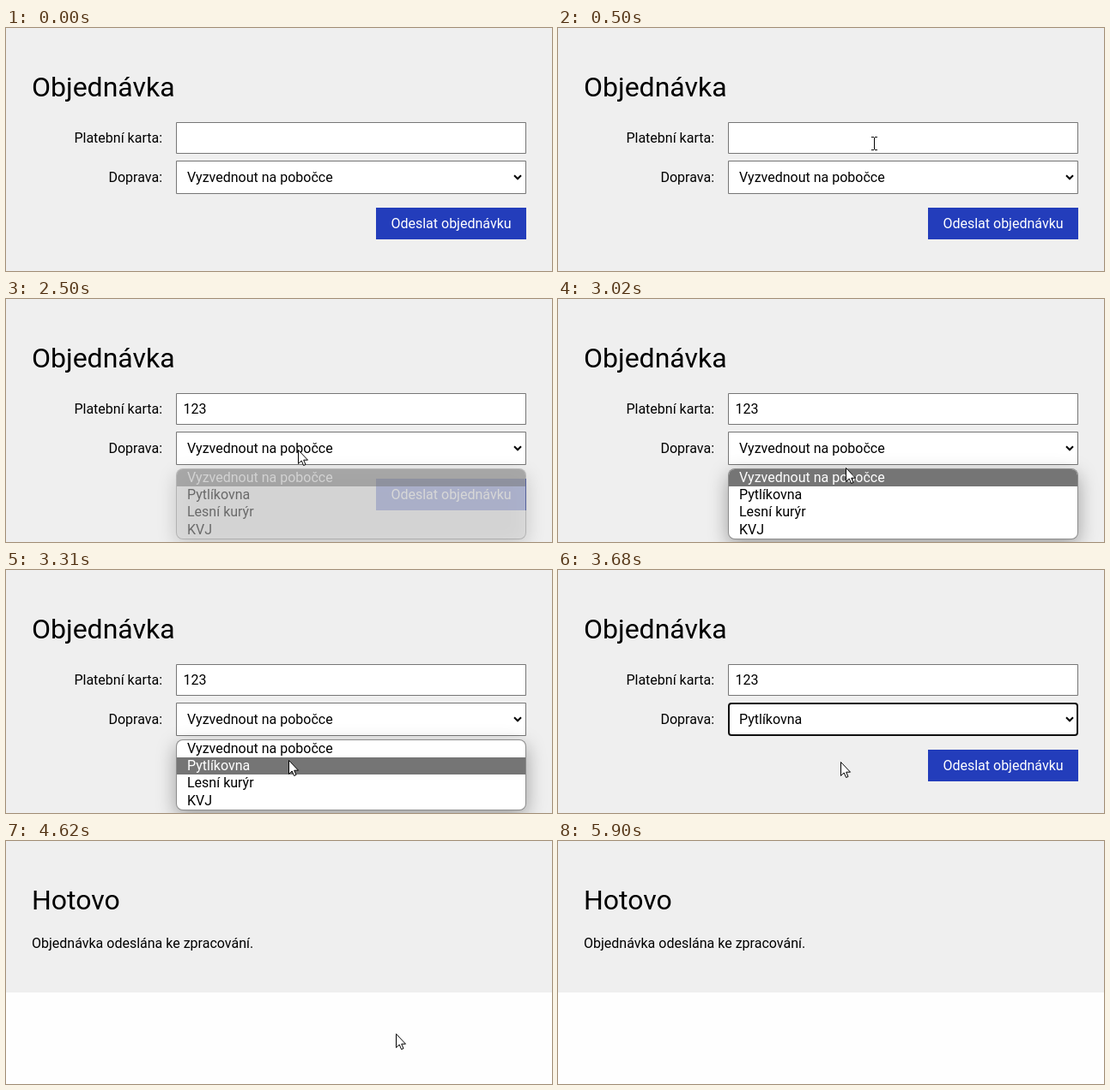
These frames come from a looping animation (636x284 px, 7790 ms). An HTML page with a canvas:

```html
<!DOCTYPE html>
<html lang="cs">
<head>
<meta charset="utf-8">
<title>Objednávka</title>
<style>
html, body { margin: 0; width: 100%; height: 100%; overflow: hidden; background: #efefef; }
canvas { display: block; }
</style>
</head>
<body>
<canvas id="stage" width="636" height="284"></canvas>
<script>
const ctx = document.getElementById('stage').getContext('2d');
const LOOP = 7790;
const OPTIONS = ['Vyzvednout na pobočce', 'Pytlíkovna', 'Lesní kurýr', 'KVJ'];
const TYPED = [1370, 1630, 1880];
const CARET_X = [207, 215, 224, 233];

const easeOut = k => 1 - (1 - k) ** 2;
const easeIn = k => k ** 1.6;
const easeBoth = k => k * k * (3 - 2 * k);

// Pointer moves: start, end, steps, target, easing
const MOVES = [
  [230, 500, 10, 368, 135, easeOut],
  [2110, 2350, 9, 340, 176, easeBoth],
  [2900, 3410, 16, 329, 224, easeOut],
  [3850, 4230, 13, 454, 225, easeBoth],
  [5560, 5900, 11, 464, 285, easeIn]
];

const ARROW = new Path2D('M.5.5V16.5L4.2 13L6.6 18.5L9 17.5L6.7 12.2H11.5Z');
const HAND = new Path2D('M-.5 12V2Q-.5.5 1 .5T2.5 2V8Q3 6.5 4.3 6.7T5.5 8Q6 7 7.3 7.3T8.5 9' +
  'Q9 8 10.2 8.5T11.5 10V15Q11.5 18 9.5 21.5H1.5Q0 18-2 16L-4.5 12.5Q-5 11-3.5 10.7T-.5 13');
const CHEVRON = new Path2D('M592 172.3L596 176.3L600 172.3');

function rect(x, y, w, h, color) {
  ctx.fillStyle = color;
  ctx.fillRect(x, y, w, h);
}

function text(str, x, y, { size = 16, color = '#000', align = 'left' } = {}) {
  ctx.font = `${size}px Roboto, sans-serif`;
  ctx.textAlign = align;
  ctx.fillStyle = color;
  ctx.fillText(str, x, y);
}

function roundRect(x, y, w, h, r) {
  ctx.beginPath();
  ctx.roundRect(x, y, w, h, r);
}

function field(y, h, focused) {
  const width = focused ? 2 : 1;
  roundRect(198 + width / 2, y + width / 2, 408 - width, h - width, focused ? 3 : 0);
  ctx.fillStyle = '#fff';
  ctx.fill();
  ctx.lineWidth = width;
  ctx.strokeStyle = focused ? '#101010' : '#767676';
  ctx.stroke();
}

function pointerAt(t) {
  let x = 400, y = 282;
  for (const [start, end, steps, toX, toY, ease] of MOVES) {
    if (t < start) break;
    const done = Math.min((t - start) / (end - start), 1);
    const k = ease((Math.floor(done * (steps - 1)) + 1) / steps);
    x += (toX - x) * k;
    y += (toY - y) * k;
  }
  return { x: Math.round(x), y: Math.round(y) };
}

function drawPointer({ x, y }, kind) {
  if (kind === 'text') {
    rect(x - 3, y - 8, 3, 1, '#000');
    rect(x + 1, y - 8, 3, 1, '#000');
    rect(x, y - 7, 1, 14, '#000');
    rect(x - 3, y + 7, 3, 1, '#000');
    rect(x + 1, y + 7, 3, 1, '#000');
    return;
  }
  const shape = kind === 'hand' ? HAND : ARROW;
  ctx.save();
  ctx.translate(x, y);
  ctx.fillStyle = '#fff';
  ctx.strokeStyle = '#000';
  ctx.lineWidth = 1;
  ctx.fill(shape);
  ctx.stroke(shape);
  ctx.restore();
}

function drawMenu(active, opacity) {
  ctx.save();
  ctx.globalAlpha = opacity;
  roundRect(198, 198, 408, 83, 8);
  ctx.shadowColor = 'rgba(0,0,0,.35)';
  ctx.shadowBlur = 22;
  ctx.shadowOffsetY = 7;
  ctx.fillStyle = '#8c8c8c';
  ctx.fill();
  ctx.shadowColor = 'transparent';
  roundRect(199, 199, 406, 81, 7);
  ctx.clip();
  rect(199, 199, 406, 81, '#fff');
  rect(199, 199 + active * 20, 406, 20, '#757575');
  OPTIONS.forEach((name, i) =>
    text(name, 211, Math.round(214 + i * 20.2), { color: i === active ? '#fff' : '#000' }));
  ctx.restore();
}

function drawForm(t, pointer, overButton) {
  text('Objednávka', 30, 80, { size: 32 });
  text('Platební karta:', 182, 134, { align: 'right' });
  text('Doprava:', 182, 180, { align: 'right' });

  const inputFocus = t >= 680 && t < 2500;
  const count = TYPED.filter(at => t >= at).length;
  field(110, 37, inputFocus);
  text('123'.slice(0, count), 206.6, 134);
  const caretOff = (t >= 1210 && t < 1370) || t >= 2350;
  if (inputFocus && !caretOff) rect(CARET_X[count], 119, 1, 19, '#000');

  field(155, 39, t >= 3580 && t < 4490);
  text(OPTIONS[t < 3580 ? 0 : 1], 211, 180);
  ctx.lineWidth = 2;
  ctx.strokeStyle = '#000';
  ctx.stroke(CHEVRON);

  rect(431, 210, 175, 37, overButton ? '#1f37a8' : '#233dbb');
  text('Odeslat objednávku', 518.5, 234, { color: '#fff', align: 'center' });

  if (t >= 2500 && t < 3680) {
    const fading = t < 2570 || t >= 3580;
    drawMenu(t >= 2900 && pointer.y >= 219 ? 1 : 0, fading ? 0.5 : 1);
  }
}

function drawDone() {
  rect(0, 177, 636, 107, '#fefefe');
  text('Hotovo', 30, 80, { size: 32 });
  text('Objednávka odeslána ke zpracování.', 30, 125);
}

function draw(t) {
  const pointer = pointerAt(t);
  const { x, y } = pointer;
  const done = t >= 4560;
  const overInput = !done && x >= 198 && x < 606 && y >= 110 && y < 147;
  const overButton = !done && x >= 431 && x < 606 && y >= 210 && y < 247;

  rect(0, 0, 636, 284, '#efefef');
  if (done) drawDone();
  else drawForm(t, pointer, overButton);
  if (t >= 230 && t < 5900) {
    drawPointer(pointer, overInput ? 'text' : overButton ? 'hand' : 'arrow');
  }
}

function tick() {
  draw(performance.now() % LOOP);
  requestAnimationFrame(tick);
}
tick();
</script>
</body>
</html>
```
